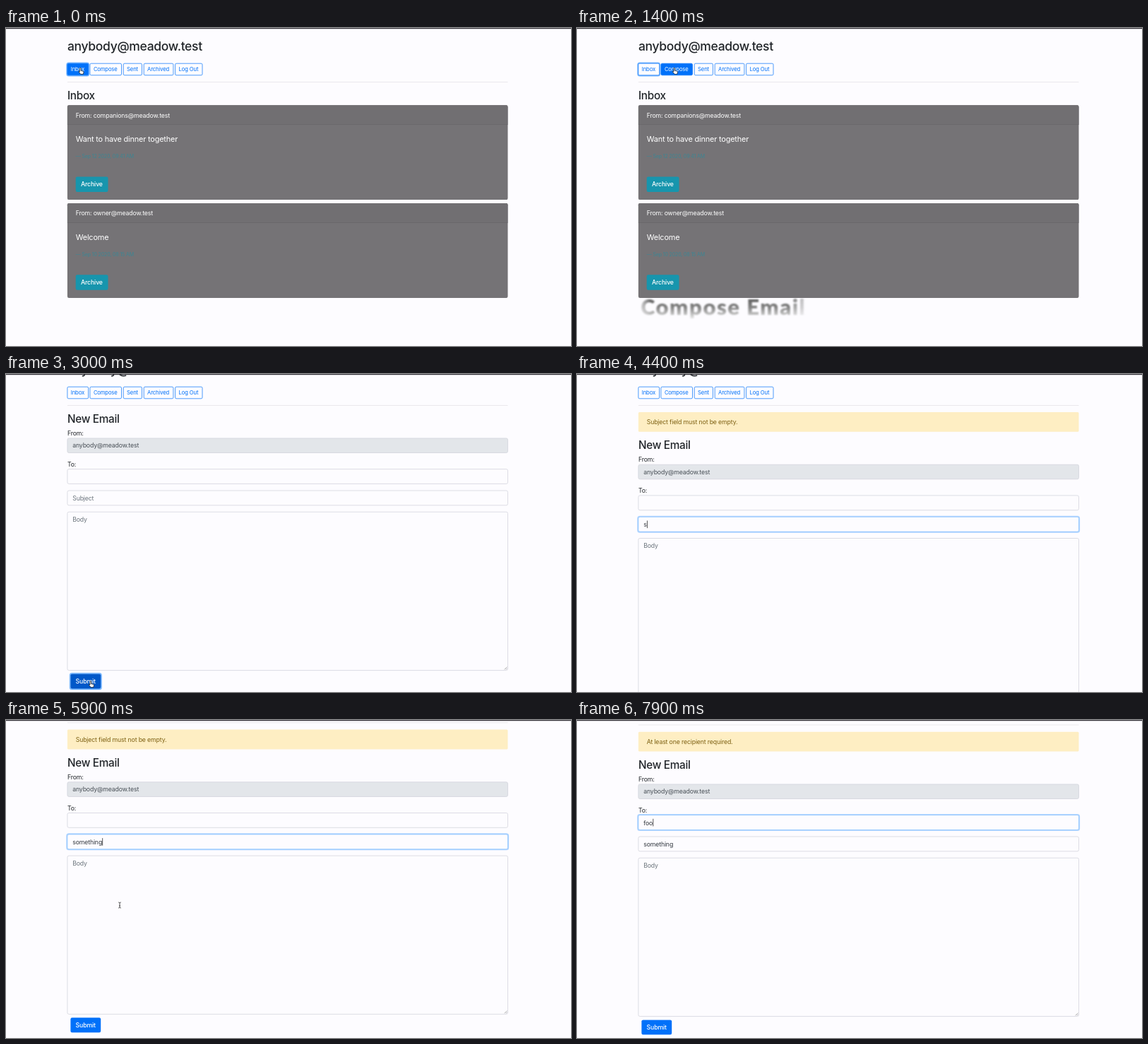
Recreate the animation shown at these times as an HTML page. Size 800x450 px, loop 8 s.

```html
<!DOCTYPE html>
<html lang="en">
<head>
<meta charset="utf-8">
<title>Mail</title>
<style>
  html, body { margin: 0; width: 100%; height: 100%; overflow: hidden; background: #fdfcff; }
  svg { display: block; width: 800px; height: 450px; }
  text { font-family: Inter, Roboto, sans-serif; letter-spacing: -.018em; white-space: pre; }
  .caption { font-family: Lato, "Open Sans", sans-serif; font-weight: 900; letter-spacing: .05em; }
</style>
</head>
<body>
<svg id="stage" viewBox="0 0 800 450"></svg>
<script>
const LOOP = 8000, STEP = 100;
const LEFT = 86.9, WIDTH = 623.6, ALERT_SHIFT = 37.3;
const BODY = 8.76, BLUE = '#0071f9', INK = '#212529';
const USER = 'anybody@meadow.test';

const rect = (x, y, w, h, attrs = '') =>
  `<rect x="${x}" y="${y}" width="${w}" height="${h}" ${attrs}/>`;
const text = (x, y, size, label, fill = INK, attrs = '') =>
  `<text x="${x}" y="${y}" font-size="${size}" fill="${fill}" ${attrs}>${label}</text>`;
const group = (id, content, attrs = '') => `<g id="${id}" ${attrs}>${content}</g>`;
const ring = (id, x, y, w, h, opacity) =>
  rect(x - .7, y - .7, w + 1.4, h + 1.4,
    `id="${id}" rx="2.6" fill="none" stroke="#007bff" stroke-width="1.9" stroke-opacity="${opacity}"`);

const navItems = [
  ['Inbox', 86.9, 29.7, 91.8], ['Compose', 118.9, 44.6, 123.9], ['Sent', 166.2, 26.2, 171.1],
  ['Archived', 195.2, 41.7, 200.1], ['Log Out', 239.6, 38.4, 244.6]
];
const navButton = ([label, x, w, tx], i) =>
  ring('navRing' + i, x, 50.2, w, 16.6, .5) +
  rect(x, 50.2, w, 16.6, `id="nav${i}" rx="1.7" stroke="${BLUE}" stroke-width=".7"`) +
  text(tx, 61.3, 7.66, label, BLUE, `id="navText${i}"`);

const card = (y, from, subject, date) => group('', [
  rect(LEFT, 0, WIDTH, 133.9, 'rx="2.2" fill="#757376"'),
  `<path d="M${LEFT} 27.4V2.2q0-2.2 2.2-2.2h${WIDTH - 4.4}q2.2 0 2.2 2.2v25.2z" fill="#716f72"/>`,
  rect(LEFT, 27.1, WIDTH, .6, 'fill="#656366"'),
  text(98.7, 17.4, BODY, 'From: ' + from, '#fff'),
  text(98.7, 51.8, 10.95, subject, '#fff'),
  text(98.7, 74.9, 7, date, '#2d8b9b', 'opacity=".8"'),
  rect(98.7, 101.2, 45.8, 21.6, 'rx="2.2" fill="#1795ad"'),
  text(106, 115.2, BODY, 'Archive', '#fff', 'font-weight="500"')
].join(''), `transform="translate(0 ${y})"`);

const field = (id, y, h, fill = '#fdfcff') =>
  ring(id + 'Ring', LEFT, y, WIDTH, h, .3) +
  rect(LEFT, y, WIDTH, h, `id="${id}Box" rx="2.2" fill="${fill}" stroke="#ced0d8" stroke-width=".7"`);
const typedField = (id, y) => field(id, y, 20.8) +
  text(94.2, y + 13.9, BODY, '', '#495057', `id="${id}Text"`) +
  rect(0, y + 5.2, .7, 10.6, `id="${id}Caret" fill="#111"`);

const form = [
  text(LEFT, 101, 15.3, 'New Email', INK, 'font-weight="500"'),
  text(LEFT, 119, BODY, 'From:'),
  field('from', 122.9, 20.6, '#e3e6ea'),
  text(94.2, 136.4, BODY, USER, '#495057'),
  text(LEFT, 162.9, BODY, 'To:'),
  typedField('to', 166.6),
  typedField('subject', 197),
  field('body', 227.2, 224.2),
  text(94.2, 241, BODY, 'Body', '#6c757d'),
  '<path d="M705.8 450.2l3.6-3.6M708 450.2l1.5-1.5" stroke="#777" stroke-width=".6"/>',
  ring('submitRing', 91.4, 456.4, 42.8, 20.9, .5),
  rect(91.4, 456.4, 42.8, 20.9, 'id="submit" rx="2.2"'),
  text(98.6, 470.2, BODY, 'Submit', '#fff', 'font-weight="500"')
].join('');

const cursors =
  group('hand', '<path d="M-1-3.6q0-1 .8-1t.8 1v3l3 .7q1 .3.9 1.4l-.6 2.8h-3.8l-2.6-3.3q-.3-1 .8-.8l.7.6z" fill="#fff" stroke="#111" stroke-width=".7"/>') +
  group('beam', '<path d="M-1.8-4q1.5 0 1.8.9.3-.9 1.8-.9M0-3.1v6.2M-1.8 4q1.5 0 1.8-.9.3.9 1.8.9M-.8.9h1.6" fill="none" stroke="#222" stroke-width=".8"/>') +
  group('arrow', '<path d="M0 0v8.2l1.9-1.7 1.3 2.9 1.3-.6-1.3-2.8h2.5z" fill="#111" stroke="#fff" stroke-width=".6"/>');

const stage = document.getElementById('stage');
stage.innerHTML = `
  <defs>
    <linearGradient id="fall" x1="0" y1="380" x2="0" y2="412" gradientUnits="userSpaceOnUse">
      <stop stop-color="#555"/><stop offset=".5" stop-color="#858585"/><stop offset="1" stop-color="#eee"/>
    </linearGradient>
    <linearGradient id="sides">
      <stop stop-color="#000"/><stop offset=".08" stop-color="#fff"/>
      <stop offset=".88" stop-color="#fff"/><stop offset="1" stop-color="#000"/>
    </linearGradient>
    <filter id="soft"><feGaussianBlur stdDeviation="1.1"/></filter>
    <mask id="below" maskUnits="userSpaceOnUse" x="76" y="381.7" width="257" height="35">
      ${rect(84, 381.7, 246, 35, 'fill="url(#sides)"')}
    </mask>
  </defs>
  ${rect(0, 0, 800, 450, 'fill="#fdfcff"')}
  ${group('page', [
    text(LEFT, 32, 17.5, USER, INK, 'font-weight="500"'),
    navItems.map(navButton).join(''),
    rect(LEFT, 76, WIDTH, .6, 'fill="#dedde0"'),
    group('inbox',
      text(LEFT, 101, 15.3, 'Inbox', INK, 'font-weight="500"') +
      card(109.2, 'companions@meadow.test', 'Want to have dinner together', '— Sep 12 2020, 09:41 AM') +
      card(248, 'owner@meadow.test', 'Welcome', '— Sep 10 2020, 08:15 AM')),
    group('compose',
      group('alert', rect(LEFT, 86, WIDTH, 27.8, 'rx="1.5" fill="#feeec3"') +
        text(98.7, 103.2, BODY, '', '#7d6012', 'id="alertText"')) +
      group('form', form))
  ].join(''))}
  ${group('caption', text(90, 406, 31, 'Compose Email', 'url(#fall)', 'class="caption" filter="url(#soft)"'), 'mask="url(#below)"')}
  ${rect(0, 0, 800, 1.2, 'fill="#35333a"')}
  ${cursors}`;

const el = {};
stage.querySelectorAll('[id]').forEach(node => { if (node.id) el[node.id] = node; });
const set = (id, name, value) => el[id].setAttribute(name, value);
const show = (id, visible) => set(id, 'display', visible ? 'inline' : 'none');
const within = (t, from, to) => t >= from && t < to;

// Keys are [time, ...values]; each span eases in and out.
function tween(keys, t) {
  const next = keys.findIndex(key => key[0] > t);
  if (next < 0) return keys[keys.length - 1].slice(1);
  if (next === 0) return keys[0].slice(1);
  const a = keys[next - 1], b = keys[next];
  const p = (t - a[0]) / (b[0] - a[0]), eased = p * p * (3 - 2 * p);
  return a.slice(1).map((v, i) => v + (b[i + 1] - v) * eased);
}

const scrollKeys = [[1800, 0], [2300, 32.4], [2600, 32], [5500, 32], [5900, 72.4], [6200, 69.3]];
const captionKeys = [[200, 0], [800, 1], [1400, 1], [1700, 0]];
const mouseKeys = [
  [500, 105.5, 61], [1000, 138, 61], [1700, 138, 61], [2200, 156, 331.5], [2500, 156, 331.5],
  [2900, 120, 439], [3300, 120, 439], [3800, 161, 213], [4400, 161, 213],
  [5600, 161, 262], [6000, 161, 262], [6400, 120, 439], [6800, 120, 439], [7200, 150, 146]
];

function updateField(id, value, placeholder, focused) {
  const label = el[id + 'Text'];
  label.textContent = value || placeholder;
  label.setAttribute('fill', value ? '#343a40' : '#6c757d');
  show(id + 'Ring', focused);
  show(id + 'Caret', focused);
  set(id + 'Box', 'stroke', focused ? '#80bdff' : '#ced0d8');
  set(id + 'Caret', 'x', 94.5 + (value ? label.getComputedTextLength() : 0));
}

function updateMouse(t, composing, scroll) {
  const [x, y] = tween(mouseKeys, t);
  const visible = !within(t, 4300, 5600) && t < 7400;
  const pageY = y + scroll - (t >= 3200 ? ALERT_SHIFT : 0);
  const overNav = y + scroll < 68;
  const overSubmit = composing && pageY > 456 && x < 134;
  const overField = composing && x > LEFT &&
    (within(pageY, 166, 188) || within(pageY, 197, 218) || within(pageY, 227, 452));
  const kind = overNav || overSubmit ? 'hand' : overField ? 'beam' : 'arrow';
  for (const id of ['hand', 'beam', 'arrow']) {
    show(id, visible && id === kind);
    set(id, 'transform', `translate(${x} ${y})`);
  }
}

function render(t) {
  const composing = t >= 1600, alerted = t >= 3200;
  const [scroll] = tween(scrollKeys, t);
  set('page', 'transform', `translate(0 ${-scroll})`);
  show('inbox', !composing);
  show('compose', composing);
  show('alert', alerted);
  set('form', 'transform', `translate(0 ${alerted ? ALERT_SHIFT : 0})`);
  el.alertText.textContent = t < 6800 ? 'Subject field must not be empty.' : 'At least one recipient required.';

  const hovered = t < 800 ? 0 : within(t, 900, 1900) ? 1 : -1;
  const focused = t < 1500 ? 0 : t < 2900 ? 1 : -1;
  navItems.forEach((_, i) => {
    set('nav' + i, 'fill', i === hovered ? BLUE : '#fdfcff');
    set('navText' + i, 'fill', i === hovered ? '#fff' : BLUE);
    show('navRing' + i, i === focused);
  });

  const typed = t < 4400 ? 0 : t < 4700 ? 1 : 2 + Math.floor((t - 4700) / STEP);
  const recipient = [7500, 7700, 7800].filter(time => t >= time).length;
  updateField('subject', 'something'.slice(0, typed), 'Subject', within(t, 3800, 6600));
  updateField('to', 'foo'.slice(0, recipient), '', t >= 7200);
  show('fromRing', false);
  show('bodyRing', false);
  show('submitRing', within(t, 3000, 3800) || within(t, 6600, 7200));
  set('submit', 'fill', within(t, 2900, 3400) || within(t, 6400, 6900) ? '#0058c9' : BLUE);

  set('caption', 'opacity', tween(captionKeys, t)[0]);
  updateMouse(t, composing, scroll);
}

const start = performance.now();
function tick() {
  const t = (performance.now() - start) % LOOP;
  render(Math.floor(t / STEP) * STEP);
  requestAnimationFrame(tick);
}
tick();
</script>
</body>
</html>
```
